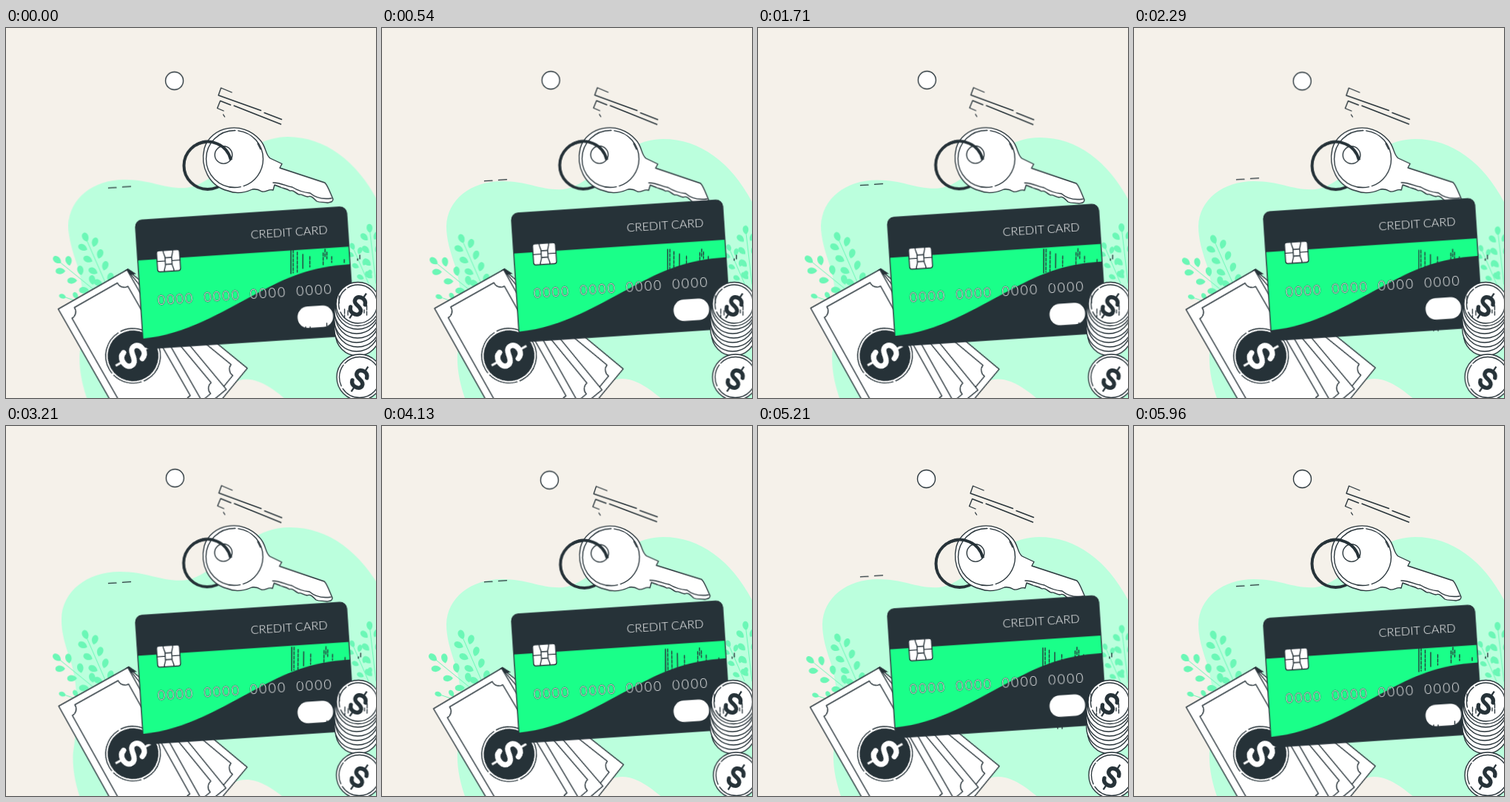
An HTML page for the animation above (6000 ms loop, 500 by 500 pixels).

```html
<!DOCTYPE html>
<html lang="en">
<head>
<meta charset="utf-8">
<title>Credit card</title>
<style>
  html, body { margin: 0; width: 100%; height: 100%; overflow: hidden; background: #f5f1ea; }
  svg { display: block; width: 100vw; height: 100vh; }
  .line { fill: none; stroke: #263238; stroke-width: 1.35; stroke-linecap: round; stroke-linejoin: round; }
  .paper { fill: #fff; stroke: #263238; stroke-width: 1.35; stroke-linejoin: round; }
  .dark { fill: #263238; }
  .leaf { fill: #6bf7b6; }
  .stem { fill: none; stroke: #6bf7b6; stroke-width: 1; }
  text { font-family: Lato, "Open Sans", sans-serif; font-weight: 300; fill: #fff; }
  .digits { font-size: 17.5px; letter-spacing: 2.3px; stroke: #263238; stroke-width: .8; paint-order: stroke; }

  .wind { animation: wind 1.5s linear -30ms infinite; }
  .float { animation: float 1.5s linear -30ms infinite; }
  .grow { animation: grow 1.5s linear -30ms infinite; }
  .beat { animation: beat 6s linear infinite; transform-origin: 320px 400px; }
  #key { transform-origin: 329px 147px; }
  #notes { transform-origin: 200px 440px; }
  #coins { transform-origin: 480px 425px; }
  #left { transform-origin: 118px 400px; }
  #right { transform-origin: 500px 400px; }

  @keyframes wind { 25% { transform: rotate(1deg); } 75% { transform: rotate(-1deg); } }
  @keyframes float { 50% { transform: translateY(-13px); } }
  @keyframes grow {
    0%, 100% { transform: scale(.992); }
    20%, 77% { transform: scale(1); }
    50% { transform: scale(.96); }
  }
  @keyframes beat {
    0% { transform: scale(1.0115); }
    .83% { transform: scale(1); }
    15.17%, 43.5%, 71.83% { transform: scale(1); animation-timing-function: cubic-bezier(.39, .575, .565, 1); }
    22.17%, 50.5%, 78.83% { transform: scale(1.067); animation-timing-function: cubic-bezier(.47, 0, .745, .715); }
    29.17%, 57.5%, 85.83% { transform: scale(1); }
    100% { transform: scale(1); }
  }
</style>
</head>
<body>
<svg viewBox="0 0 500 500">
  <defs>
    <g id="dollar" fill="none" stroke-linecap="round">
      <path stroke-width="7.2" d="M9.5-9C7.5-14 4-16 0-16C-6-16-10.5-13-10.5-8C-10.5-2-6-1 0 0C6 1 10.5 3 10.5 8C10.5 13 6 16 0 16C-5 16-8.5 13.5-10 9"/>
      <path stroke-width="3" stroke-linecap="butt" d="M0-27V-16M0 16V27"/>
    </g>
    <g id="note">
      <path class="paper" d="M0 0H107V210H0Z"/>
      <path class="line" d="M20 9H87A10 10 0 0 0 97 20V190A10 10 0 0 0 87 201H20A10 10 0 0 0 10 190V20A10 10 0 0 0 20 9Z"/>
    </g>
  </defs>

  <path class="beat" fill="#bbffdd" d="M102 440C108 400 110 358 99 322C92 302 87 285 87 268C88 232 120 207 162 207C198 207 215 220 245 218C285 214 320 150 380 150C430 150 472 182 500 235L600 345V640L400 530C390 515 384 505 374 498C356 483 335 470 316 475C302 479 292 489 285 500L230 560H140C118 520 100 480 102 440Z"/>

  <g id="left" class="grow"></g>
  <g id="right" class="grow"></g>

  <g id="key" class="wind">
    <circle class="paper" cx="227.5" cy="71.5" r="12"/>
    <path class="line" stroke-linecap="butt" d="M305 87L290.5 81L287 91L344.5 111.5M349 114.5L372.5 123.5M303.5 104L289.5 98.5L285.5 108.5L294 112M308 105L371.5 130M293.5 117L295.5 120"/>
    <circle cx="272.5" cy="186" r="32" fill="none" stroke="#263238" stroke-width="4"/>
    <path class="paper" d="M343 151C352 160 350 171 357 176L373 183.5L370 189L431 209C435 213 438 222 442 231C442 235 439 235 435 236C428 235 424 236 420 234C415 229 412 226 408 228C402 227 400 224 396 225C390 222 388 218 384 220C378 216 374 217 371 215L363 212L361 219C355 217 352 222 346 221C341 218 338 217 333 218C322 223 310 224 300 220C275 214 262 188 268 163C276 133 320 124 343 151Z"/>
    <circle class="line" cx="309" cy="177" r="38.5" stroke-dasharray="48 4 130 4 60 0"/>
    <path class="line" d="M340 156L344 164M361 209C372 209 379 214 387 215C395 220 401 222 411 223C418 229 426 232 440 230"/>
    <circle class="paper" cx="294" cy="171.5" r="11.8"/>
    <path d="M304 178.5A32 32 0 0 0 257 158" fill="none" stroke="#263238" stroke-width="4"/>
  </g>

  <g id="notes" class="wind">
    <g transform="translate(70.5 380) rotate(-29.8)">
      <use href="#note" transform="rotate(-21 107 0)"/>
      <use href="#note" transform="rotate(-10 107 0)"/>
      <path class="dark" d="M104-1H109L115 11L107 8Z"/>
      <use href="#note"/>
      <circle class="dark" cx="56.5" cy="105" r="34.3"/>
      <circle class="line" cx="56.5" cy="105" r="37" stroke-dasharray="62 4 40 4"/>
      <use href="#dollar" stroke="#fff" transform="translate(56.5 105) rotate(90)"/>
    </g>
  </g>

  <g id="card" class="float">
    <path class="line" d="M138.5 216.7L149 216.2M157.5 215.4L168.5 214.7"/>
    <g transform="translate(174.5 260.6) rotate(-3.75)">
      <rect class="dark" width="286" height="174" rx="9"/>
      <path fill="#1aff89" d="M0 54.3H286V78C230 78 198 91 158 109C108 131 60 158 0 160Z"/>
      <rect class="line" width="286" height="174" rx="9"/>
      <text x="154.5" y="34.6" font-size="16.3">CREDIT CARD</text>
      <g class="digits">
        <text x="23.2" y="115.5">0000</text>
        <text x="85.8" y="115.5">0000</text>
        <text x="148.3" y="115.5">0000</text>
        <text x="211" y="115.5">0000</text>
      </g>
      <rect class="paper" x="26" y="43" width="31" height="28.5" rx="3"/>
      <path class="line" d="M37 53H46V62H37ZM37 53C37 49 35 49 35 43M46 53C46 49 48 49 48 43M37 62C37 66 35 66 35 71.5M46 62C46 66 48 66 48 71.5M26 57.3H37M46 57.3H57"/>
      <rect x="210.5" y="131.3" width="48" height="29" rx="14" fill="#fff"/>
    </g>
  </g>

  <g id="coins" class="wind">
    <path class="line" stroke-linecap="butt" d="M385 300V332M397.5 340V349M401 306V325M405 404V409M411 404V409M478 307V312M433.5 399V403M475 312V314"/>
    <path class="line" stroke-linecap="butt" stroke-dasharray="4 2" d="M388 300V331M393.5 303V330M410.5 309V323M428.5 304V322M431 299V309M433.5 303V312M440 309V317M457 313V318"/>
    <g id="stack"></g>
    <g id="faces"></g>
    <path class="line" stroke-linecap="butt" stroke-dasharray="6 2" d="M457.5 380V391M462 382V388M487.5 375V388M450 362V372M484 381V385"/>
  </g>
</svg>
<script>
  const add = (id, markup) => document.getElementById(id).insertAdjacentHTML('beforeend', markup);

  // A leaf of half-length r pointing at angle deg (0 is up).
  const leaf = (x, y, deg, r) =>
    `<path class="leaf" transform="translate(${x} ${y}) rotate(${deg})" d="M0 ${r}C${-r} ${r * .3} ${-r * .7} ${-r} 0 ${-r}C${r * .7} ${-r} ${r} ${r * .3} 0 ${r}Z"/>`;

  // A stem from base to tip with pairs of leaves and one on top.
  function plant(id, bx, by, tx, ty, pairs, r) {
    const dx = tx - bx, dy = ty - by, len = Math.hypot(dx, dy);
    const ux = dx / len, uy = dy / len;
    const lean = Math.atan2(dx, -dy) * 180 / Math.PI;
    let out = `<path class="stem" d="M${bx} ${by}L${tx} ${ty}"/>`;
    for (let i = 0; i < pairs; i++) {
      const k = (i + .5) / pairs, x = bx + dx * k, y = by + dy * k, d = r * 1.35;
      for (const s of [-1, 1])
        out += leaf(x - uy * s * d + ux * 4, y + ux * s * d + uy * 4, lean + s * 40, r);
    }
    add(id, out + leaf(tx + ux * r, ty + uy * r, lean, r));
  }

  plant('left', 138, 352, 110, 288, 4, 6.6);
  plant('left', 122, 356, 74, 317, 3, 6.6);
  plant('left', 110, 374, 81, 364, 1, 5);
  plant('right', 500, 345, 492, 276, 4, 6.2);
  plant('right', 490, 345, 470, 299, 3, 5);

  for (let y = 413; y >= 377; y -= 6) {
    const shift = y % 4 === 1 ? .7 : -.7;
    add('stack', `<circle class="paper" cx="${474.5 + shift}" cy="${y}" r="30"/>`);
  }
  for (const [x, y, r] of [[475.5, 373, 29.5], [478, 472, 31]]) {
    add('faces', `<circle class="paper" cx="${x}" cy="${y}" r="${r}"/>
      <circle class="line" cx="${x}" cy="${y}" r="${r - 3.5}" stroke-dasharray="70 4 30 3"/>
      <use href="#dollar" stroke="#263238" transform="translate(${x} ${y + 2.5}) rotate(34) scale(.75)"/>`);
  }
</script>
</body>
</html>
```
